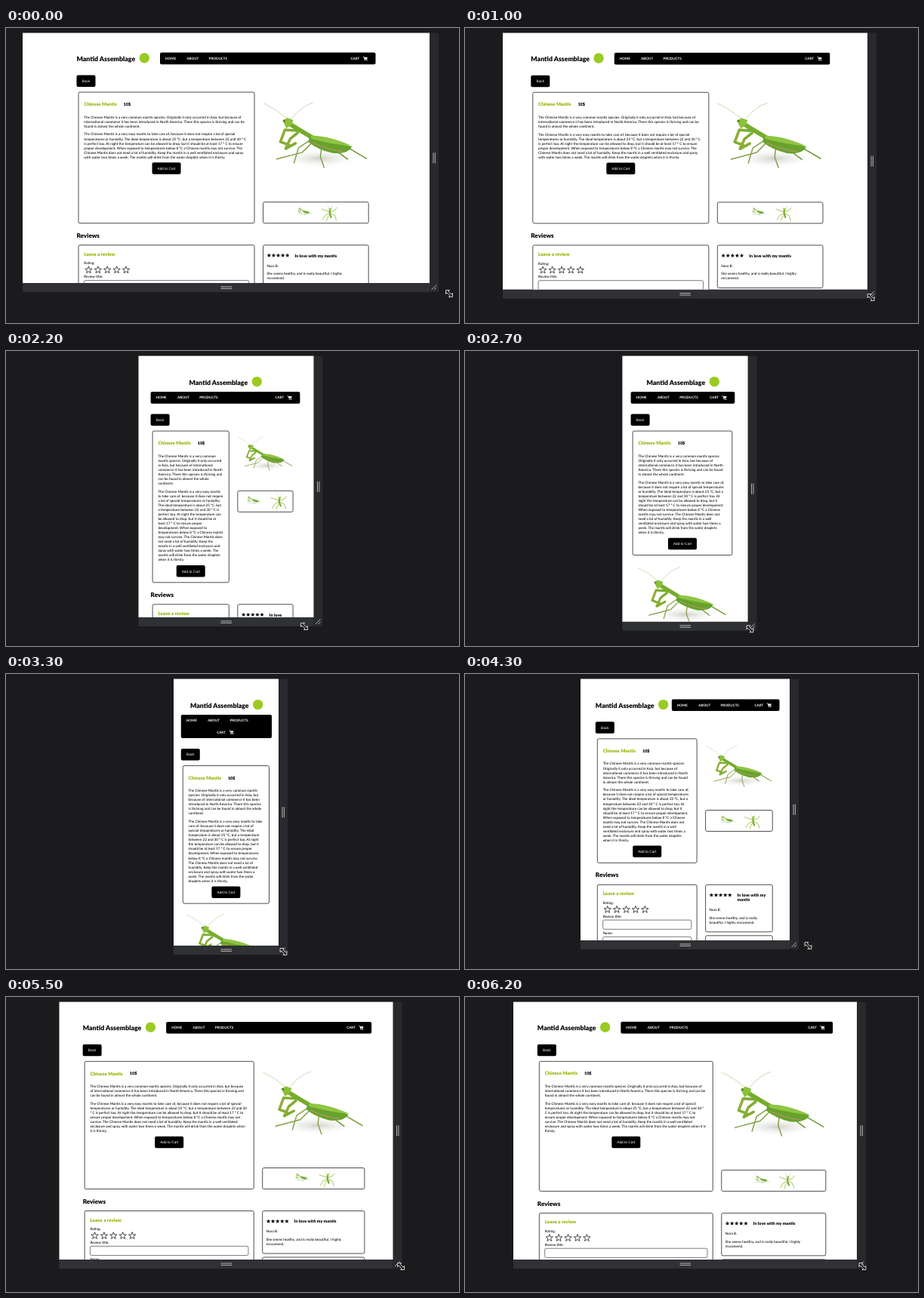
These frames come from a looping animation (600x391 px, 6300 ms). An HTML page:

```html
<!DOCTYPE html>
<html lang="en">
<head>
<meta charset="utf-8">
<title>Responsive shop page</title>
<style>
html, body { margin: 0; width: 100%; height: 100%; overflow: hidden; background: #1b1b1d; }
svg { display: block; width: 100vw; height: 100vh; }
text { font-family: Lato, sans-serif; text-rendering: geometricPrecision; white-space: pre; }
text.btn { font-family: "Liberation Sans", Arial, sans-serif; }
</style>
</head>
<body>
<svg viewBox="0 0 600 391" xmlns="http://www.w3.org/2000/svg">
  <defs>
    <clipPath id="view"><rect id="viewRect" y="6.5"/></clipPath>
    <radialGradient id="shade"><stop offset="0" stop-color="#cfd2c8"/><stop offset="1" stop-color="#fff" stop-opacity="0"/></radialGradient>
    <!-- both insects are drawn in a 140 unit square -->
    <g id="mantis" fill="none" stroke-linecap="round" stroke-linejoin="round">
      <ellipse cx="75" cy="88" rx="55" ry="13" fill="url(#shade)"/>
      <path d="M34 37Q18 23 1 15M37 36Q50 19 66 14" stroke="#b9c48e" stroke-width=".7"/>
      <path d="M62 64L47 74 41 94M66 66L52 80 18 89M78 70L76 86 81 100" stroke="#86a04a" stroke-width="1.5"/>
      <path d="M88 66L108 71 137 88M84 70L100 80 112 89" stroke="#6f9a34" stroke-width="1.6"/>
      <path d="M44 51L29 50 23 66 34 70M46 54L36 62 30 75 43 68" stroke="#7fae2f" stroke-width="3.6"/>
      <path d="M29 51L24 64M36 63L32 72" stroke="#b7a24a" stroke-width="1.2"/>
      <path d="M35 42Q46 49 70 63" stroke="#76ad2c" stroke-width="6"/>
      <path d="M62 58Q82 58 118 73Q112 83 92 81 72 76 60 66Z" fill="#66a32b"/>
      <path d="M63 58Q86 57 119 72Q96 70 64 62Z" fill="#8fc443"/>
      <path d="M66 67Q82 75 106 79" stroke="#a89660" stroke-width="1.6"/>
      <path d="M26 38L32 34 40 37 38 43 31 48Z" fill="#8cc03a"/>
      <circle cx="28" cy="38" r="1.7" fill="#5e8126"/>
    </g>
    <g id="front" fill="none" stroke-linecap="round" stroke-linejoin="round">
      <path d="M70 56L34 46 10 36M78 58L112 46 126 26M66 72L40 84 18 118M84 72L112 86 124 122M72 80L56 104 50 126" stroke="#93bd3c" stroke-width="5"/>
      <path d="M76 40Q68 66 84 100" stroke="#79ac2e" stroke-width="13"/>
      <path d="M62 32L90 28 78 48Z" fill="#9cc744"/>
      <path d="M70 30L54 8M84 28L96 8" stroke="#b9c48e" stroke-width="2.5"/>
    </g>
    <g id="cart" fill="none" stroke="#fff" stroke-width=".7">
      <path d="M0-2.5H1.2L2.3 1.2H5.8"/>
      <path d="M1.5-1.8H6.1L5.4.4H2.2Z" fill="#fff" stroke="none"/>
      <circle cx="2.7" cy="2.2" r=".4"/><circle cx="5.2" cy="2.2" r=".4"/>
    </g>
  </defs>
  <rect width="600" height="391" fill="#1b1b1d"/>
  <g id="frame"></g>
  <g id="page" clip-path="url(#view)"></g>
  <path id="cursor" d="M-4.4-4.4H.5L-1.1-2.8 2.8 1.1 4.4-.5V4.4H-.5L1.1 2.8-2.8-1.1-4.4.5Z" fill="#111" stroke="#f2f2f2" stroke-width=".9"/>
</svg>
<script>
const LOOP = 6300, STEP = 100, HELD = [300, 500, 700];
const TOP = 6.5, MID = 291.5;
const GREEN = '#91b500';

// [time, value] pairs
const LEFT = [[0, 22], [50, 22], [100, 13], [200, 6], [400, 2], [700, 3], [1000, 50], [1400, 112],
  [1500, 127], [1600, 140], [1700, 151], [2100, 166], [2200, 175.5], [2300, 178], [2800, 216],
  [3000, 221], [3300, 222], [3500, 220], [4000, 190], [4200, 174], [4300, 153], [4400, 145],
  [4900, 93], [5000, 88], [5600, 67], [6200, 64]];
const BOTTOM = [[0, 338], [200, 342], [700, 344], [1400, 350], [1600, 351], [2200, 353],
  [2800, 360], [3500, 360], [4200, 354], [4300, 353], [5000, 348], [6200, 348]];
const CURSOR_X = [[0, 587], [150, 589.5], [400, 589], [700, 584], [1400, 476], [1600, 447],
  [2100, 420], [2200, 395], [2800, 374], [3300, 367.5], [3500, 371], [4200, 445], [4300, 454.5],
  [4900, 502], [5000, 504], [5600, 527], [6200, 526.5]];
const CURSOR_Y = [[0, 352], [600, 354], [1400, 360], [1600, 360], [2200, 365], [2800, 369],
  [3300, 368], [3500, 369], [4200, 361], [4300, 360], [5000, 357], [6200, 357]];

const INTRO = 'The Chinese Mantis is a very common mantis species. Originally it only occurred in Asia, but because of international commerce it has been introduced in North America. There this species is thriving and can be found in almost the whole continent.';
const CARE = 'The Chinese Mantis is a very easy mantis to take care of, because it does not require a lot of special temperatures or humidity. The ideal temperature is about 25 °C, but a temperature between 22 and 30 ° C is perfect too. At night the temperature can be allowed to drop, but it should be at least 17 ° C to ensure proper development. When exposed to temperatures below 8 °C a Chinese mantis may not survive. The Chinese Mantis does not need a lot of humidity. Keep the mantis in a well ventilated enclosure and spray with water two times a week. The mantis will drink from the water droplets when it is thirsty.';
const SHOP = 'Mantid Assemblage';
const REVIEWS = [
  ['In love with my mantis', 'Nora B.', 'She seems healthy, and is really beautiful. I highly reccomend.'],
  ['Healthy bug', 'Emil T.', 'Arrived quickly and eats very well.']
];

const $ = id => document.getElementById(id);
const ctx = document.createElement('canvas').getContext('2d');
const clamp = (v, a, b) => Math.max(a, Math.min(b, v));

function at(keys, t) {
  let i = keys.findIndex(k => k[0] > t);
  if (i < 0) return keys[keys.length - 1][1];
  const [t0, a] = keys[i - 1], [t1, b] = keys[i];
  return a + (b - a) * (t - t0) / (t1 - t0);
}

// text width per unit of font size
function unit(s, weight) {
  ctx.font = `${weight} 100px Lato, sans-serif`;
  return ctx.measureText(s).width / 100;
}
const face = (weight, sample, width) => ({ weight, size: width / unit(sample, weight) });

const BODY = face(500, INTRO.slice(0, INTRO.indexOf(' international')), 209.5);
const NAV = face(700, 'PRODUCTS', 24.5);
const LOGO = face(900, SHOP, 78);
const TITLE = face(900, 'Chinese Mantis', 43.5);
const HEAD = face(900, 'Reviews', 30.5);
const SMALL = face(900, 'In love with my mantis', 56);

function text(x, y, s, f, fill = '#000') {
  return `<text x="${x}" y="${y + f.size * .35}" font-size="${f.size}" font-weight="${f.weight}" fill="${fill}">${s}</text>`;
}

function wrap(s, f, width) {
  const lines = [];
  let line = '';
  for (const word of s.split(' ')) {
    const next = line ? line + ' ' + word : word;
    if (line && unit(next, f.weight) * f.size > width) {
      lines.push(line);
      line = word;
    } else line = next;
  }
  return lines.concat(line);
}

const LINE = 6.05;
const block = (x, y, lines, f) => lines.map((s, i) => text(x, y + i * LINE, s, f)).join('');

const rect = (x, y, w, h, fill, extra = '') =>
  `<rect x="${x}" y="${y}" width="${w}" height="${h}" fill="${fill}" ${extra}/>`;
const card = (x, y, w, h) => rect(x, y, w, h, '#fff', 'rx="2" stroke="#222" stroke-width=".8"');
const use = (id, x, y, k = 1) => `<use href="#${id}" transform="translate(${x} ${y}) scale(${k})"/>`;

function button(cx, cy, w, s) {
  return rect(cx - w / 2, cy - 7.75, w, 15.5, '#000', 'rx="2"') +
    `<text class="btn" x="${cx}" y="${cy + 1.7}" font-size="4.75" text-anchor="middle" fill="#fff">${s}</text>`;
}

function stars(x, y, gap, r, style) {
  let d = '';
  for (let i = 0; i < 5; i++)
    for (let k = 0; k < 10; k++) {
      const a = k * Math.PI / 5, q = k % 2 ? r * .42 : r;
      d += (k ? 'L' : 'M') + (x + i * gap + q * Math.sin(a)).toFixed(2) + ' ' +
        (y - q * Math.cos(a)).toFixed(2) + (k == 9 ? 'Z' : '');
    }
  return `<path d="${d}" ${style}/>`;
}

function header(cl, c, row, dy) {
  const tight = c < 135;
  const gap = 101 + 9.5 * clamp((c - 252) / 70, 0, 1);
  const logoX = row ? cl : cl + c / 2 - 48;
  const nx = row ? cl + gap : cl, ny = row ? 33.4 + dy : 54;
  const right = cl + c, ty = ny + 7.9;
  const cx = tight ? cl + c / 2 - 12.7 : right - 33, cy = tight ? ny + 23.2 : ty;
  const back = (row ? 63.3 + dy : tight ? 99 : 83.5) + 7.75;
  const svg = text(logoX, 41.6 + dy, SHOP, LOGO) +
    `<circle cx="${logoX + 89.8}" cy="${40.6 + dy}" r="6.7" fill="#9acb22"/>` +
    rect(nx, ny, right - nx, tight ? 31 : 15.7, '#000', 'rx="2"') +
    text(nx + 7, ty, 'HOME', NAV, '#fff') + text(nx + 35.4, ty, 'ABOUT', NAV, '#fff') +
    text(nx + 64.6, ty, 'PRODUCTS', NAV, '#fff') + text(cx, cy, 'CART', NAV, '#fff') +
    use('cart', cx + 16.2, cy) + button(cl + 12.5, back, 25, 'Back');
  return [svg, back + 14.8];
}

function product(x, y, w, minH) {
  const tx = x + 7.3, tw = w - 14.6;
  const a = wrap(INTRO, BODY, tw), b = wrap(CARE, BODY, tw);
  const y1 = y + 33, y2 = y1 + (a.length - 1) * LINE + 10.7;
  const by = y2 + (b.length - 1) * LINE + 15;
  const h = Math.max(minH, by + 15 - y);
  const svg = card(x, y, w, h) + text(tx, y + 16, 'Chinese Mantis', TITLE, GREEN) +
    text(tx + 52.3, y + 16.2, '10$', SMALL) + block(tx, y1, a, BODY) +
    block(tx, y2, b, BODY) + button(x + w / 2, by, 38, 'Add to Cart');
  return [svg, h];
}

function gallery(x, y, w, size) {
  const cx = x + w / 2, ty = y + size + 6;
  return use('mantis', cx - size / 2, y, size / 140) + card(x, ty, w, 28) +
    use('mantis', cx - 27, ty + 2, .16) + use('front', cx + 6, ty + 3, .17);
}

function form(x, y, w) {
  const tx = x + 7.3;
  const field = (dy, label, h) => text(tx, y + dy, label, BODY) +
    rect(tx, y + dy + 5, w - 14.6, h, '#fff', 'rx="2" stroke="#444" stroke-width=".7"');
  return card(x, y, w, 140) + text(tx, y + 11.9, 'Leave a review', TITLE, GREEN) +
    text(tx, y + 24, 'Rating:', BODY) +
    stars(x + 13.4, y + 33, 12.4, 4.9, 'fill="#fff" stroke="#111" stroke-width=".75"') +
    field(41.8, 'Review title:', 12.2) + field(64, 'Name:', 12.2) + field(86.2, 'Review:', 30);
}

function review(x, y, w, [title, name, body]) {
  const head = wrap(title, SMALL, w - 47), lines = wrap(body, BODY, w - 15);
  const ny = y + 27.3 + (head.length - 1) * LINE;
  const h = ny + 10.6 + (lines.length - 1) * LINE + 12.5 - y;
  const svg = card(x, y, w, h) + stars(x + 7.8, y + 13.8, 6.1, 2.9, 'fill="#000"') +
    block(x + 42, y + 14, head, SMALL) + text(x + 5, ny, name, BODY) +
    block(x + 5, ny + 10.6, lines, BODY);
  return [svg, h];
}

function drawPage(left, width) {
  const c = Math.min(.86 * width, 396), cl = left + (width - c) / 2;
  const row = width > 273, single = width < 213;
  const dy = row ? -clamp((width - 283) / 320, 0, .8) : 0;
  const gx = cl + 2.5;
  const w1 = single ? c - 6 : .665 * c - 30.3;
  const x2 = single ? gx : gx + w1 + 11.5;
  const w2 = single ? w1 : cl + c - 9.3 - x2;
  const size = single ? .865 * c : w2;
  let [svg, y] = header(cl, c, row, dy);
  const [info, h] = product(gx, y, w1, single ? 0 : w2 + 34);
  svg += info + gallery(x2, single ? y + h + 4 : y, w2, size);
  y += h + (single ? size + 38 : 0);
  svg += text(cl, y + 16.3, 'Reviews', HEAD) + form(gx, y + 29, w1);
  let ry = y + 29 + (single ? 145 : 0);
  for (const r of REVIEWS) {
    const [s, rh] = review(x2, ry, w2, r);
    svg += s;
    ry += rh + 5;
  }
  return svg;
}

function drawFrame(left, right, bottom) {
  const my = (TOP + bottom) / 2;
  return rect(right, TOP, 12, bottom - TOP + 12, '#28292c') +
    rect(left, bottom, right - left, 12, '#2f3134') +
    rect(left, TOP, right - left, bottom - TOP, '#fff') +
    `<path d="M${right + 5} ${my - 7}v14M${right + 7.4} ${my - 7}v14M${MID - 7} ${bottom + 5}h14.5M${MID - 7} ${bottom + 7.4}h14.5M${right + 2.5} ${bottom + 9}l6.5-6.5M${right + 6} ${bottom + 9}l3.2-3.2" fill="none" stroke="#b4b5b7" stroke-width="1"/>`;
}

function draw(t) {
  const left = at(LEFT, t), right = 2 * MID - left, bottom = at(BOTTOM, t);
  // the content is laid out slightly ahead of the frame
  const width = 2 * (MID - at(LEFT, t + 40));
  const view = $('viewRect');
  view.setAttribute('x', left);
  view.setAttribute('width', right - left);
  view.setAttribute('height', bottom - TOP);
  $('frame').innerHTML = drawFrame(left, right, bottom);
  $('page').innerHTML = drawPage(left, width);
  $('cursor').setAttribute('transform', `translate(${at(CURSOR_X, t)} ${at(CURSOR_Y, t)})`);
}

let shown = -1;
const start = performance.now();
function tick() {
  let t = Math.floor(((performance.now() - start) % LOOP) / STEP) * STEP;
  if (HELD.includes(t)) t -= STEP;
  if (t !== shown) draw(shown = t);
  requestAnimationFrame(tick);
}
tick();
</script>
</body>
</html>
```
